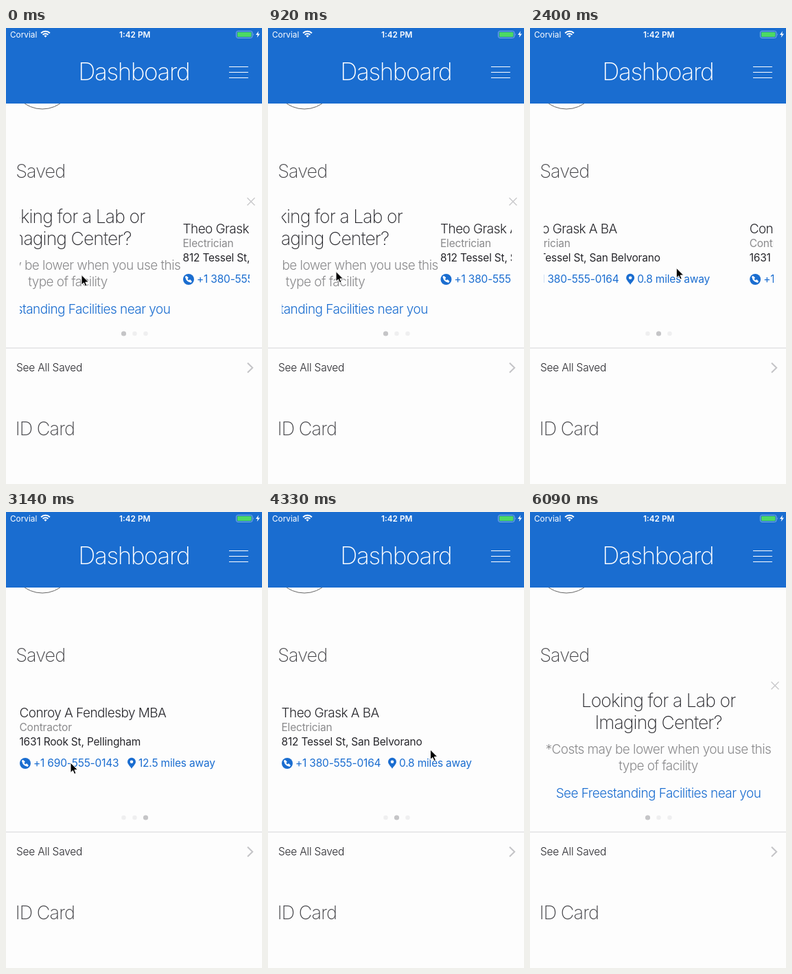
An HTML page that plays this animation: 373 by 664 pixels, repeating every 6.53 s.

```html
<!DOCTYPE html>
<html lang="en">
<head>
<meta charset="utf-8">
<title>Dashboard</title>
<style>
  html, body { margin: 0; width: 100%; height: 100%; overflow: hidden; background: #fdfdfd; }
  svg { display: block; width: 373px; height: 664px; }
  text { font-family: Inter, Roboto, sans-serif; font-optical-sizing: none; white-space: pre; fill: #26262b; }
  .bar { font-size: 35px; font-weight: 200; letter-spacing: -.04em; fill: #fff; }
  .status { font-size: 11.8px; fill: #fff; }
  .clock { font-size: 11.8px; font-weight: 600; fill: #fff; }
  .section { font-size: 27px; font-weight: 200; letter-spacing: -.034em; fill: #444448; }
  .headline { font-size: 26.5px; font-weight: 200; letter-spacing: -.034em; text-anchor: middle; }
  .note { font-size: 19px; font-weight: 300; letter-spacing: -.03em; text-anchor: middle; fill: #8a8a8c; }
  .link { font-size: 19px; font-weight: 350; letter-spacing: -.029em; text-anchor: middle; fill: #1a6dd0; }
  .name { font-size: 19px; font-weight: 300; letter-spacing: -.03em; }
  .body { font-size: 15.5px; letter-spacing: -.013em; }
  .job { fill: #8a8a8c; }
  .blue { fill: #1a6dd0; }
  .row { font-weight: 350; }
  .line { fill: none; stroke-linecap: butt; }
</style>
</head>
<body>
<svg viewBox="0 0 373 664" xmlns="http://www.w3.org/2000/svg">
  <defs>
    <clipPath id="window"><rect x="20" y="240" width="335" height="200"/></clipPath>
    <g id="phone">
      <circle r="8" fill="#1a6dd0"/>
      <path d="M-3.6-3.6Q-3 2.6 3.4 3.4" fill="none" stroke="#fff" stroke-width="2.2"/>
      <path d="M-3.4-3.4-1.9-2.2M2 1.9 3.2 3.2" stroke="#fff" stroke-width="3" stroke-linecap="round"/>
    </g>
    <path id="pin" d="M0 8C-1.2 5.3-6 1.7-6-2A6 6 0 0 1 6-2C6 1.7 1.2 5.3 0 8ZM0-4.3A2.3 2.3 0 1 0 0 .3 2.3 2.3 0 1 0 0-4.3Z" fill="#1a6dd0"/>
  </defs>

  <rect width="373" height="664" fill="#fdfdfd"/>
  <circle class="line" cx="53" cy="72" r="46" stroke="#666"/>
  <rect width="373" height="110" fill="#1a6dd0"/>

  <text class="status" x="6" y="13.6">Corvial</text>
  <g class="line" stroke="#fff" stroke-width="2" transform="translate(57.5 13.2)">
    <path d="M-6.4-5.7A8.8 8.8 0 0 1 6.4-5.7M-3.9-3.3A5.4 5.4 0 0 1 3.9-3.3"/>
    <path d="M0 .6-2-1.6A2.8 2.8 0 0 1 2-1.6Z" fill="#fff" stroke="none"/>
  </g>
  <text class="clock" x="165" y="13.6">1:42 PM</text>
  <rect x="335.5" y="4.5" width="23.5" height="10" rx="2.5" fill="none" stroke="#7eaee6"/>
  <rect x="337" y="6" width="20.5" height="7" rx="1" fill="#4cd964"/>
  <path d="M360.3 7.7Q362 9.5 360.3 11.3Z" fill="#7eaee6"/>
  <path d="M368 4.5 364 10H366.7L365.7 14 370 8.5H367.2Z" fill="#fff"/>

  <text class="bar" x="105.3" y="76">Dashboard</text>
  <path class="line" d="M325 56.5H353M325 64.5H353M325 72.5H353" stroke="#fff"/>

  <text class="section" x="14.2" y="217.6">Saved</text>
  <g clip-path="url(#window)"><g id="cards"></g></g>
  <path id="close" class="line" d="M351.5 247.3 362.5 258.3M362.5 247.3 351.5 258.3" stroke="#c9c9cb" stroke-width="1.4"/>
  <g id="dots"></g>

  <path class="line" d="M0 466H373" stroke="#e9e9ea" stroke-width="2"/>
  <text class="body row" x="15" y="500">See All Saved</text>
  <path class="line" d="M352 487.7 359.2 494.7 352 501.7" stroke="#c4c4c7" stroke-width="2"/>
  <text class="section" x="13.8" y="592.5">ID Card</text>

  <path id="cursor" d="M0 0V14.6L3.4 11.5 5.6 16.6 8 15.5 5.8 10.6H10.5Z" fill="#000" stroke="#fff" stroke-linejoin="round"/>
</svg>

<script>
const LOOP = 6530, STEP = 148, LEAD = 20, PAGE = 335;
const el = id => document.getElementById(id);
const text = (cls, x, y, s) => `<text class="${cls}" x="${x}" y="${y}">${s}</text>`;

const intro =
  text("headline", 187, 283.6, "Looking for a Lab or") +
  text("headline", 187, 315.6, "Imaging Center?") +
  text("note", 187, 352, "*Costs may be lower when you use this") +
  text("note", 187, 375.8, "type of facility") +
  text("link", 187, 415.6, "See Freestanding Facilities near you");

function contact(page, name, job, address, phone, distance, pinX) {
  return `<g transform="translate(${20 + page * PAGE} 0)">` +
    text("name", -.5, 298.6, name) +
    text("body job", -.5, 318.8, job) +
    text("body", -.5, 340.2, address) +
    `<use href="#phone" x="8" y="366"/>` + text("body blue", 20, 371.2, phone) +
    `<use href="#pin" x="${pinX}" y="365.7"/>` + text("body blue", pinX + 10, 371.2, distance) +
    "</g>";
}

el("cards").innerHTML = intro +
  contact(1, "Theo Grask A BA", "Electrician", "812 Tessel St, San Belvorano",
    "+1 380-555-0164", "0.8 miles away", 161) +
  contact(2, "Conroy A Fendlesby MBA", "Contractor", "1631 Rook St, Pellingham",
    "+1 690-555-0143", "12.5 miles away", 163);

el("dots").innerHTML = [0, 1, 2].map(i => `<circle cx="${171.5 + 16 * i}" cy="445"/>`).join("");
const dots = [...el("dots").children];

const ease = (k, from, to) => {
  const u = Math.min(1, Math.max(0, (k - from) / (to - from)));
  return u * u * (3 - 2 * u);
};

// Each move eases the value on to its goal between two steps
const follow = (k, value, moves) => moves.reduce(
  (v, { from, to, goal }) => v + (goal - v) * ease(k, from, to), value);

const swipes = [
  { from: 0, to: 8, goal: 104.7 },
  { from: 8, to: 11.7, goal: PAGE },
  { from: 15, to: 20, goal: 2 * PAGE },
  { from: 23, to: 27, goal: PAGE },
  { from: 33, to: 36.7, goal: 0 }
];

const strokes = [
  { from: 0, to: 8, x: 97, y: 353.6 },
  { from: 9, to: 12, x: 255, y: 344 },
  { from: 14, to: 20, x: 94, y: 365 },
  { from: 22, to: 28, x: 236.5, y: 346 },
  { from: 29, to: 31.7, x: 117, y: 349 },
  { from: 33, to: 36, x: 289, y: 339 },
  { from: 36, to: 40, x: 294, y: 641 }
];
const axis = name => strokes.map(s => ({ from: s.from, to: s.to, goal: s[name] }));
const strokesX = axis("x"), strokesY = axis("y");

function draw(time) {
  const k = Math.max(0, Math.floor((time % LOOP - LEAD) / STEP));
  const offset = follow(k, 97, swipes);
  const current = Math.round(offset / PAGE);
  el("cards").setAttribute("transform", `translate(${-offset} 0)`);
  dots.forEach((dot, i) => {
    dot.setAttribute("r", i === current ? 3.6 : 3.3);
    dot.setAttribute("fill", i === current ? "#c5c5c7" : "#efeff0");
  });
  el("close").style.display = k < 12 || k > 38 ? "" : "none";
  el("cursor").style.display = k < 41 ? "" : "none";
  el("cursor").setAttribute("transform",
    `translate(${follow(k, 110, strokesX)} ${follow(k, 359.5, strokesY)})`);
}

const start = performance.now();
function tick() {
  draw(performance.now() - start);
  requestAnimationFrame(tick);
}
tick();
</script>
</body>
</html>
```
